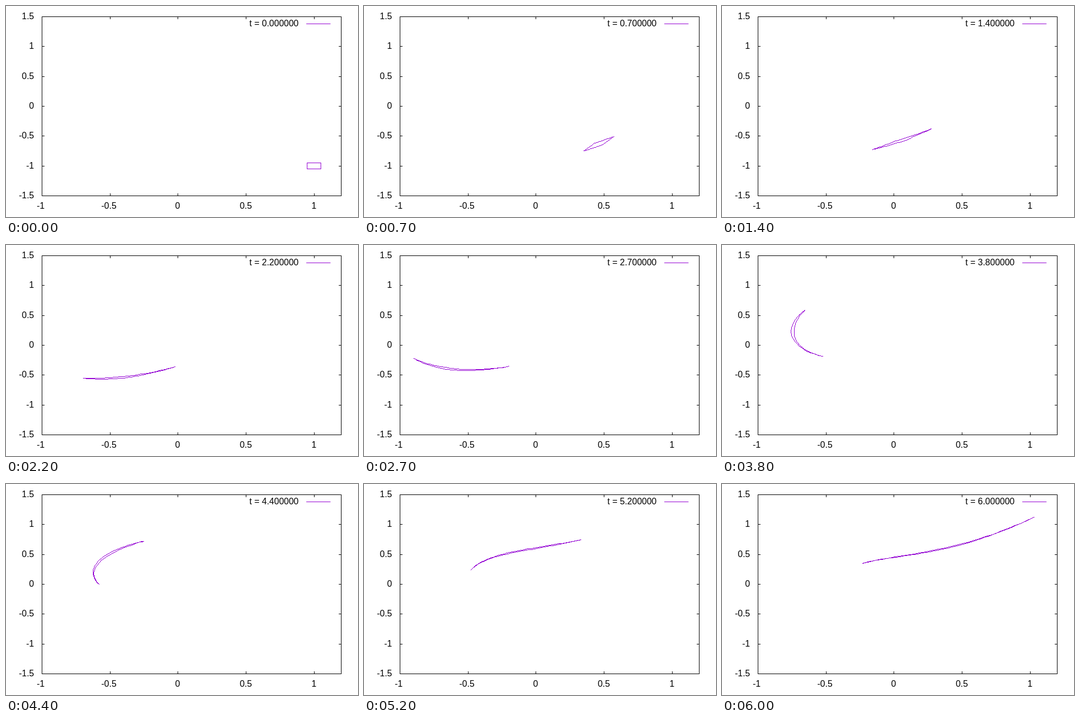
Animation, 640 px wide and 384 px high, one loop 6100 ms. Source, as an HTML page with a canvas:

```html
<!DOCTYPE html>
<html lang="en">
<head>
<meta charset="utf-8">
<title>Phase space flow</title>
<style>
  html, body { margin: 0; width: 100%; height: 100%; overflow: hidden; background: #fff; }
  canvas, svg { position: absolute; left: 0; top: 0; }
  text { font: 16px "Liberation Sans", Arial, sans-serif; fill: #000; }
</style>
</head>
<body>
<canvas id="plot" width="640" height="384"></canvas>
<svg id="labels" width="640" height="384"></svg>
<script>
const ctx = document.getElementById('plot').getContext('2d');
const svg = document.getElementById('labels');

const LEFT = 65, RIGHT = 609, TOP = 19, BOTTOM = 345, TIC = 4;
const PURPLE = '#9400d3', BLACK = '#000';
const STEP_MS = 100, STEPS = 61, SIDE_POINTS = 20, SUBSTEPS = 10;

const toX = x => Math.round(LEFT + (x + 1) / 2.2 * (RIGHT - LEFT));
const toY = y => Math.round(BOTTOM - (y + 1.5) / 3 * (BOTTOM - TOP));

// One pixel wide line without antialiasing
function line(x0, y0, x1, y1) {
  const n = Math.max(Math.abs(x1 - x0), Math.abs(y1 - y0), 1);
  for (let i = 0; i <= n; i++) {
    ctx.fillRect(Math.round(x0 + (x1 - x0) * i / n), Math.round(y0 + (y1 - y0) * i / n), 1, 1);
  }
}

function label(text, x, y, anchor) {
  const node = document.createElementNS('http://www.w3.org/2000/svg', 'text');
  node.setAttribute('x', x);
  node.setAttribute('y', y);
  node.setAttribute('text-anchor', anchor);
  node.textContent = text;
  svg.appendChild(node);
  return node;
}

const ticsX = [-1, -0.5, 0, 0.5, 1];
const ticsY = [-1.5, -1, -0.5, 0, 0.5, 1, 1.5];
ticsX.forEach(v => label(v, toX(v) - (v < 0 ? 2 : 0), 369, 'middle'));
ticsY.forEach(v => label(v, 51, toY(v) + 5, 'end'));
const clock = label('', 532, 37, 'end');

function drawAxes() {
  ctx.fillStyle = BLACK;
  for (const x of [LEFT, RIGHT]) line(x, TOP, x, BOTTOM);
  for (const y of [TOP, BOTTOM]) line(LEFT, y, RIGHT, y);
  for (const v of ticsX) {
    const x = toX(v);
    line(x, TOP, x, TOP + TIC);
    line(x, BOTTOM, x, BOTTOM - TIC);
  }
  for (const v of ticsY) {
    const y = toY(v);
    line(LEFT, y, LEFT + TIC, y);
    line(RIGHT, y, RIGHT - TIC, y);
  }
}

// Outline of a small square around (1, -1)
function startOutline() {
  const corners = [[0.95, -1.05], [1.05, -1.05], [1.05, -0.95], [0.95, -0.95]];
  return corners.flatMap(([x, p], i) => {
    const [nx, np] = corners[(i + 1) % 4];
    return Array.from({ length: SIDE_POINTS }, (_, k) => {
      const f = k / SIDE_POINTS;
      return [x + (nx - x) * f, p + (np - p) * f];
    });
  });
}

// Runge-Kutta step for x' = p, p' = x^2
function advance([x, p], h) {
  const p2 = p + h / 2 * x * x, x2 = x + h / 2 * p;
  const p3 = p + h / 2 * x2 * x2, x3 = x + h / 2 * p2;
  const p4 = p + h * x3 * x3, x4 = x + h * p3;
  return [
    x + h / 6 * (p + 2 * p2 + 2 * p3 + p4),
    p + h / 6 * (x * x + 2 * x2 * x2 + 2 * x3 * x3 + x4 * x4)
  ];
}

const outlines = [startOutline()];
while (outlines.length < STEPS) {
  let points = outlines[outlines.length - 1];
  for (let i = 0; i < SUBSTEPS; i++) {
    points = points.map(q => advance(q, 0.1 / SUBSTEPS));
  }
  outlines.push(points);
}

function draw(step) {
  ctx.fillStyle = '#fff';
  ctx.fillRect(0, 0, 640, 384);
  ctx.fillStyle = PURPLE;
  line(546, 32, 589, 32);
  const points = outlines[step].map(([x, p]) => [toX(x), toY(p)]);
  points.forEach((q, i) => line(...q, ...points[(i + 1) % points.length]));
  drawAxes();
  clock.textContent = 't = ' + (step / 10).toFixed(6);
}

const start = performance.now();
let shown = -1;
function tick() {
  const step = Math.floor((performance.now() - start) / STEP_MS) % STEPS;
  if (step !== shown) draw(shown = step);
  requestAnimationFrame(tick);
}
tick();
</script>
</body>
</html>
```
